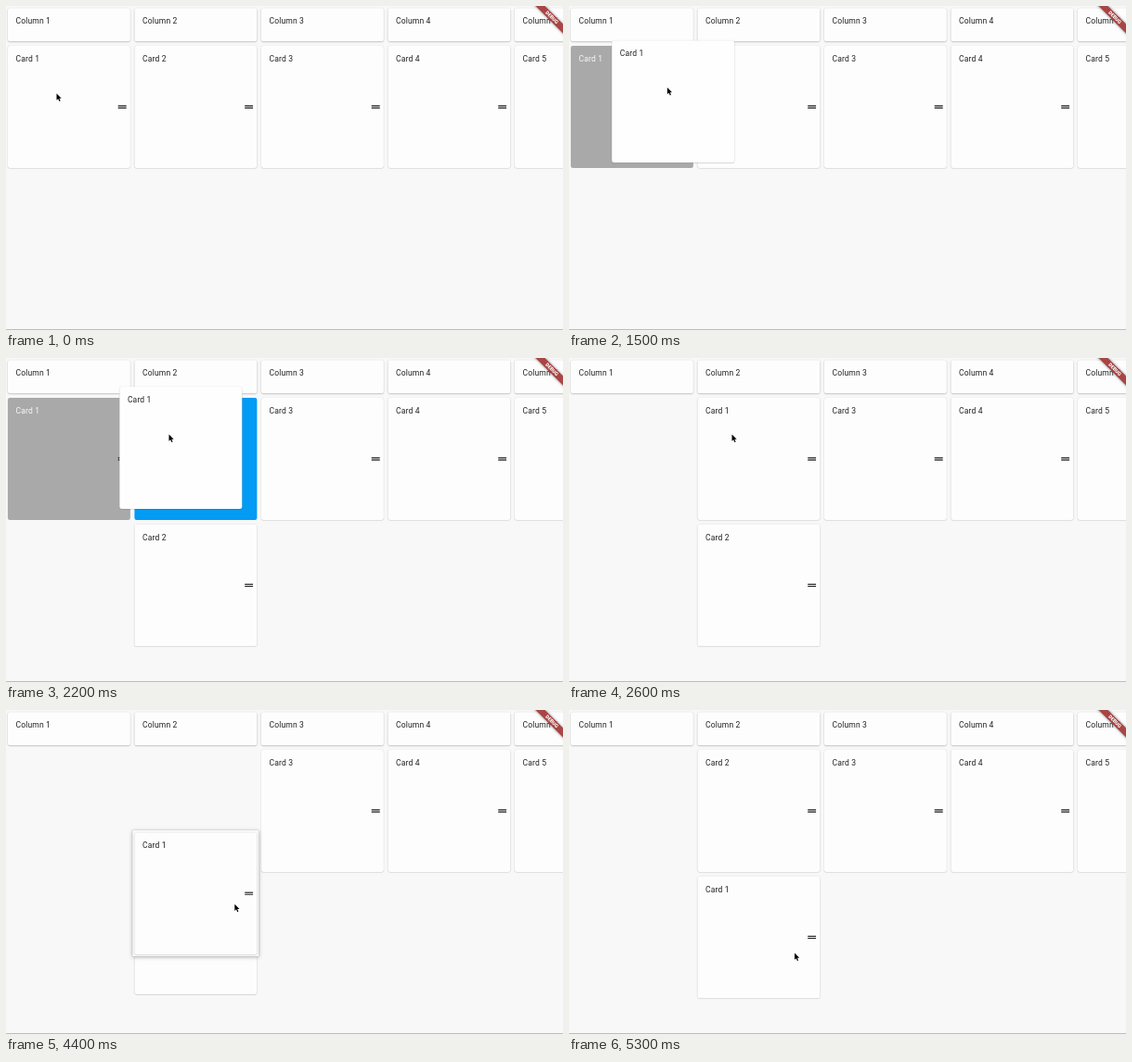
Animation, 600 px wide and 350 px high, one loop 6.6 s. Source, as an HTML page:

```html
<!DOCTYPE html>
<html lang="en">
<head>
<meta charset="utf-8">
<title>Card board</title>
<style>
  html, body { margin: 0; width: 100%; height: 100%; overflow: hidden; background: #f8f8f8; }
  #stage {
    position: relative; width: 600px; height: 350px; overflow: hidden;
    background: #f8f8f8;
    font: 8.55px/12px Roboto, sans-serif; letter-spacing: .15px; color: #212121;
  }
  #stage div, #stage svg { position: absolute; }
  .tile {
    left: 0; top: 0; width: 132.2px; height: 132.2px; border-radius: 2.3px;
    background: #fdfdfd; white-space: nowrap;
    box-shadow: 0 .6px 1px rgba(0,0,0,.16), 0 0 1.2px rgba(0,0,0,.14);
  }
  .tile span { position: absolute; left: 8.6px; top: 7.6px; }
  .head { height: 36.4px; box-shadow: 0 .7px 1.6px rgba(0,0,0,.26), 0 0 1px rgba(0,0,0,.1); }
  .ghost { background: #a9a9a9; color: #f8f8f8; box-shadow: none; }
  .slot { background: #039bf3; box-shadow: none; }
  .float { background: #fefefe; }
  .grip { left: 118px; top: 64px; fill: #1c1c1c; }
  #lift {
    left: 0; top: 0; width: 136.4px; height: 136.4px;
    border-radius: 1px; background: #fafafa;
  }
  #banner {
    left: 560.5px; top: 9.1px; width: 54px; height: 6.8px; transform: rotate(45deg);
    background: #a84545; box-shadow: 0 0 3px rgba(0,0,0,.5);
    color: #fff; font: 900 5.3px/6.9px Roboto, sans-serif; letter-spacing: 0; text-align: center;
  }
  #floor { left: 0; top: 349px; width: 600px; height: 1px; background: #bcbcbc; }
  #cursor { left: 0; top: 0; overflow: visible; }
</style>
</head>
<body>
<div id="stage"></div>
<script>
const LOOP = 6600, STEP = 100;
const PITCH = 136.5, LEFT = 1.9, TOP = 43;
const LOW = TOP + PITCH;
const GRAB = { x: 53, y: 51.5, reorder: 77.5, lag: 30 };
const PRESS = 800, DROP = 2600, LIFT = 3950, RELEASE = 5000, SETTLE = 300;

// Pointer moves, each eased from the last point
const HOME = [54.5, 94.5];
const MOVES = [
  { from: 300, to: 400, x: 55, y: 94.5 },
  { from: 1150, to: 1900, x: 168, y: 80 },
  { from: 1900, to: 2200, x: 175.5, y: 82.5 },
  { from: 2950, to: 3430, x: 257, y: 104.8 },
  { from: 3430, to: 3650, x: 261, y: 107.5 },
  { from: 3650, to: 3800, x: 258.5, y: 108 },
  { from: 4000, to: 4710, x: 238, y: 279 },
  { from: 4750, to: 5200, x: 243, y: 262.5 }
];

const stage = document.getElementById('stage');
const mix = (a, b, k) => a + (b - a) * k;
const progress = (t, from, to) => Math.min(1, Math.max(0, (t - from) / (to - from)));
const smooth = k => k * k * (3 - 2 * k);
const colX = i => LEFT + PITCH * (i - 1);

function pointer(t) {
  let [x, y] = HOME;
  for (const m of MOVES) {
    const k = smooth(progress(t, m.from, m.to));
    x = mix(x, m.x, k);
    y = mix(y, m.y, k);
  }
  return [x, y];
}

function add(cls, html = '', id = '') {
  const el = document.createElement('div');
  el.className = cls;
  el.id = id;
  el.innerHTML = html;
  stage.append(el);
  return el;
}

const place = (el, x, y) => { el.style.transform = `translate(${x}px, ${y}px)`; };
const show = (el, on) => { el.style.visibility = on ? 'visible' : 'hidden'; };

const GRIP = '<svg class="grip" width="10" height="4"><path d="M.8 .3h9v1.2h-9zM.8 2.5h9v1.2h-9z"/></svg>';

function tile(cls, text, x, y, grip) {
  const el = add('tile ' + cls, `<span>${text}</span>` + (grip ? GRIP : ''));
  place(el, x, y);
  return el;
}

for (let i = 1; i <= 5; i++) tile('head', 'Column ' + i, colX(i), 2.2);
for (let i = 3; i <= 5; i++) tile('', 'Card ' + i, colX(i), TOP, true);
const ghost = tile('ghost', 'Card 1', colX(1), TOP, true);
const slot = tile('slot', '', colX(2), TOP);
const card2 = tile('', 'Card 2', colX(2), TOP, true);
const lift = add('', '', 'lift');
const card1 = tile('', 'Card 1', colX(1), TOP, true);
const drag = tile('float', 'Card 1', colX(1), TOP);
add('', '', 'floor');
add('', 'DEBUG', 'banner');
stage.insertAdjacentHTML('beforeend',
  `<svg id="cursor" width="6" height="9"><path d="M0 0V7.3L1.7 5.7L2.9 8.5L4.1 8L2.9 5.3H5.2Z"
   fill="#000" stroke="#fff" stroke-width=".8" paint-order="stroke"/></svg>`);
const cursor = document.getElementById('cursor');

function card1Y(t) {
  if (t < LIFT) return TOP;
  const held = Math.max(TOP, pointer(Math.min(t, RELEASE))[1] - GRAB.reorder);
  const k = progress(t, RELEASE, RELEASE + SETTLE);
  return mix(held, LOW, k * (2 - k));
}

function render(t) {
  const [x, y] = pointer(t);
  place(cursor, x, y);

  // Drag between columns
  const dragging = t >= PRESS && t < DROP;
  const entered = x > colX(2);
  const [dx, dy] = pointer(t - GRAB.lag);
  show(drag, dragging);
  show(ghost, dragging);
  show(slot, dragging && entered);
  place(drag, dx - GRAB.x, dy - GRAB.y);

  // Reorder within the column
  const x1 = colX(t < DROP ? 1 : 2), y1 = card1Y(t);
  const swap = smooth(progress(t, 4373, 4623));
  show(card1, !dragging);
  place(card1, x1, y1);
  place(card2, colX(2), entered ? mix(LOW, TOP, swap) : TOP);

  const up = progress(t, LIFT, LIFT + 250) * (1 - progress(t, RELEASE, RELEASE + SETTLE));
  show(lift, up > 0);
  place(lift, x1 - 2.1, y1 - 2.1);
  lift.style.boxShadow = `0 ${up}px ${4 * up}px rgba(0,0,0,.3), 0 0 ${1.5 * up}px rgba(0,0,0,.22)`;
}

const start = performance.now();
function tick() {
  const t = (performance.now() - start) % LOOP;
  render(Math.floor(t / STEP) * STEP);
  requestAnimationFrame(tick);
}
tick();
</script>
</body>
</html>
```
